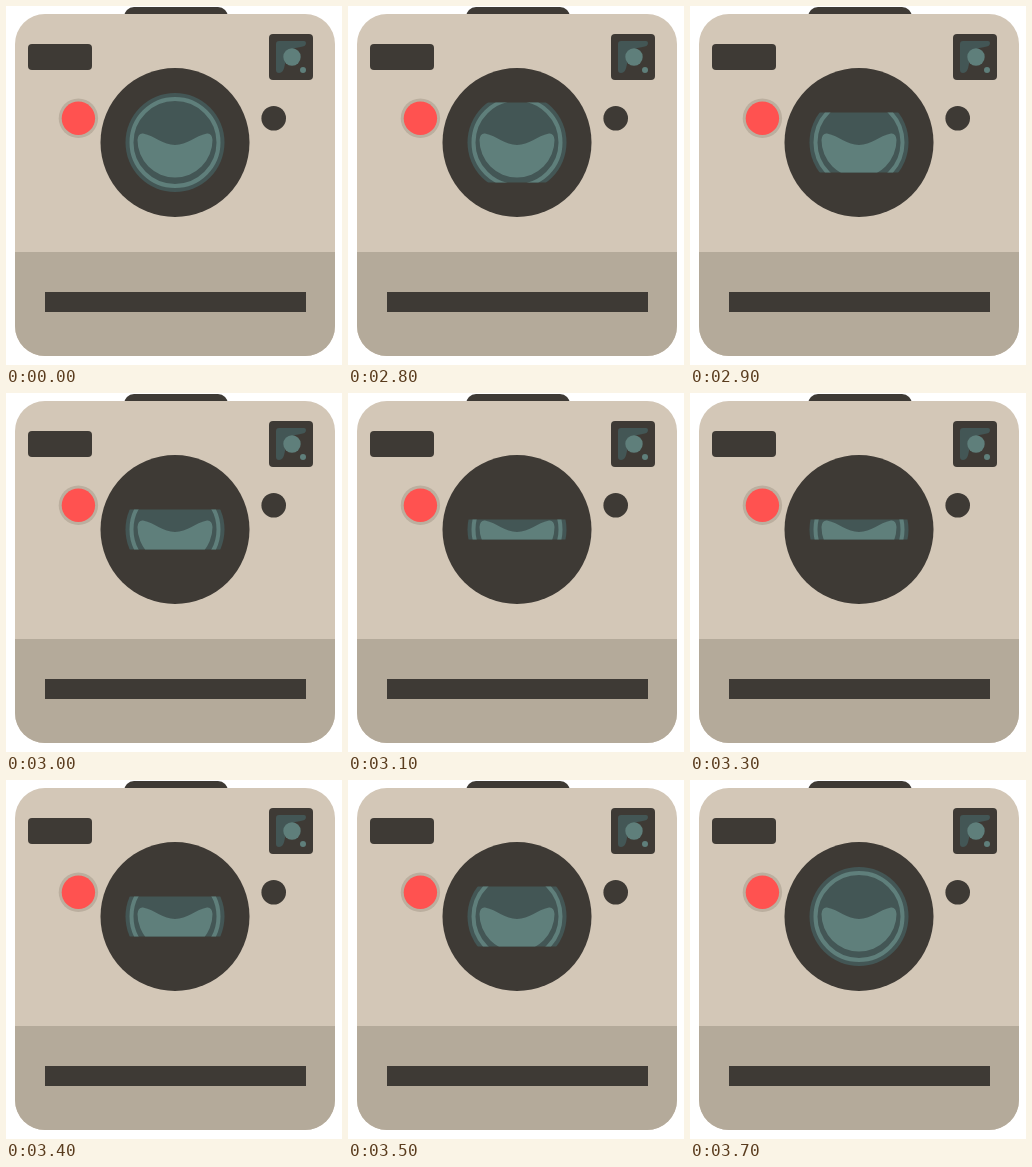
Write an HTML page that moves like this. It is 336 px wide and 359 px high and loops after 3.8 s.

```html
<!DOCTYPE html>
<html lang="en">
<head>
<meta charset="utf-8">
<title>Instant camera</title>
<style>
  html, body { margin: 0; width: 100%; height: 100%; overflow: hidden; background: #fff; }
  svg { display: block; width: 336px; height: 359px; }
  .dark { fill: #3e3a35; }
  .teal { fill: #435655; }
  .glass { fill: #5f7f7b; }
</style>
</head>
<body>
<svg viewBox="0 0 336 359">
  <clipPath id="shutter"><rect id="gap" x="119" width="100"/></clipPath>

  <!-- body -->
  <rect class="dark" x="118" y="1" width="104" height="30" rx="10"/>
  <rect x="9" y="8" width="320" height="342" rx="30" fill="#d3c7b7"/>
  <path d="M9 246H329V320A30 30 0 0 1 299 350H39A30 30 0 0 1 9 320Z" fill="#b4aa9a"/>
  <rect class="dark" x="39" y="286" width="261" height="20"/>

  <!-- flash, release and sensor -->
  <rect class="dark" x="22" y="38" width="64" height="26" rx="4"/>
  <circle cx="72.4" cy="112.3" r="19.7" fill="#bbaf9f"/>
  <circle cx="72.4" cy="112.3" r="16.7" fill="#ff5250"/>
  <circle class="dark" cx="267.7" cy="112.3" r="12.3"/>

  <!-- viewfinder -->
  <rect class="dark" x="263" y="28" width="44" height="46" rx="4"/>
  <path class="teal" d="M273 35H298Q300 35 300 37C300 43 291 39 284 45C277 52 281 67 273 67Q270 67 270 64V38Q270 35 273 35Z"/>
  <circle class="glass" cx="286" cy="51" r="8.7"/>
  <circle class="glass" cx="297" cy="64" r="3"/>

  <!-- lens -->
  <circle class="dark" cx="169" cy="136.5" r="74.5"/>
  <g clip-path="url(#shutter)">
    <circle class="teal" cx="169" cy="136.5" r="49.5"/>
    <circle cx="169" cy="136.5" r="43.5" fill="none" stroke="#5f7f7b" stroke-width="4"/>
    <path class="glass" d="M131.5 134Q132 127 137 127.5C149 130 157 139 169 139S189 130 201 127.5Q206 127 206.5 134A37.5 37.5 0 0 1 131.5 134Z"/>
  </g>
</svg>
<script>
  const LOOP = 3800, STEP = 100, CLOSED = 3200, CENTER = 136.5;
  const gap = document.getElementById('gap');

  // The shutter moves 10px per step, closing and then opening around CLOSED.
  function draw() {
    const time = performance.now() % LOOP;
    const step = Math.floor(time / STEP);
    const half = Math.min(50, 10 * Math.abs(step - CLOSED / STEP));
    gap.setAttribute('y', CENTER - half);
    gap.setAttribute('height', 2 * half);
    requestAnimationFrame(draw);
  }
  draw();
</script>
</body>
</html>
```
